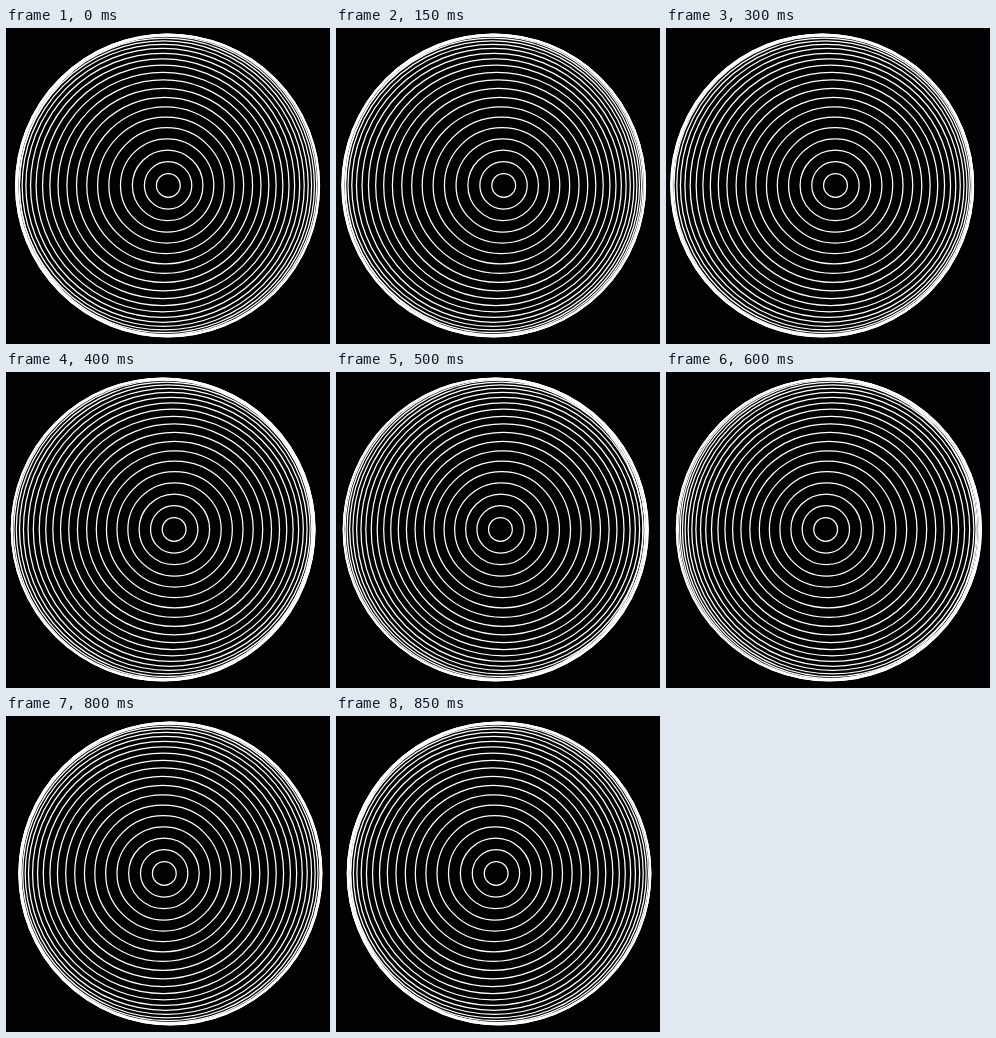
These frames come from a looping animation (324 by 316 pixels, 900 ms). An HTML page:

```html
<!DOCTYPE html>
<html lang="en">
<head>
<meta charset="utf-8">
<title>Ring wave</title>
<style>
  html, body { margin: 0; width: 100%; height: 100%; overflow: hidden; background: #020103; }
  svg { display: block; width: 100vw; height: 100vh; }
  circle { fill: none; stroke: #fff; stroke-width: 1.25; }
</style>
</head>
<body>
<svg id="stage" viewBox="0 0 324 316"></svg>
<script>
  const LOOP = 900, STEP = 50;
  const COUNT = 24, GAP = 3.486;       // latitude rings and degrees between them
  const RADIUS = 151.4, DIST = 4;      // outline of the sphere, eye distance in sphere radii
  const RAD = Math.PI / 180;
  const stage = document.getElementById('stage');
  const mix = (a, b, k) => a + (b - a) * k;

  // Radius of a latitude ring seen in perspective
  function ringRadius(deg) {
    const a = deg * RAD;
    return RADIUS * Math.sqrt(DIST * DIST - 1) * Math.sin(a) / (DIST - Math.cos(a));
  }

  const rings = Array.from({ length: COUNT }, (_, i) => {
    const el = document.createElementNS('http://www.w3.org/2000/svg', 'circle');
    el.setAttribute('cy', 157.4);
    el.setAttribute('r', ringRadius((i + 1) * GAP));
    stage.appendChild(el);
    return el;
  });

  // A sideways swing travels outwards, each ring lagging the one inside it
  function draw(ms) {
    const turn = Math.floor(ms % LOOP / STEP) * STEP / LOOP * 360;
    const phase = turn - 20 + 12 * Math.cos(turn * RAD);
    rings.forEach((el, i) => {
      const k = Math.pow(i / (COUNT - 1), 1.5);
      const swing = mix(6.3, 4.3, k) * Math.sin((phase - 215 * k) * RAD);
      el.setAttribute('cx', mix(163.2, 160.3, k) + swing);
    });
  }

  const start = performance.now();
  function tick() {
    draw(performance.now() - start);
    requestAnimationFrame(tick);
  }
  draw(0);
  requestAnimationFrame(tick);
</script>
</body>
</html>
```
